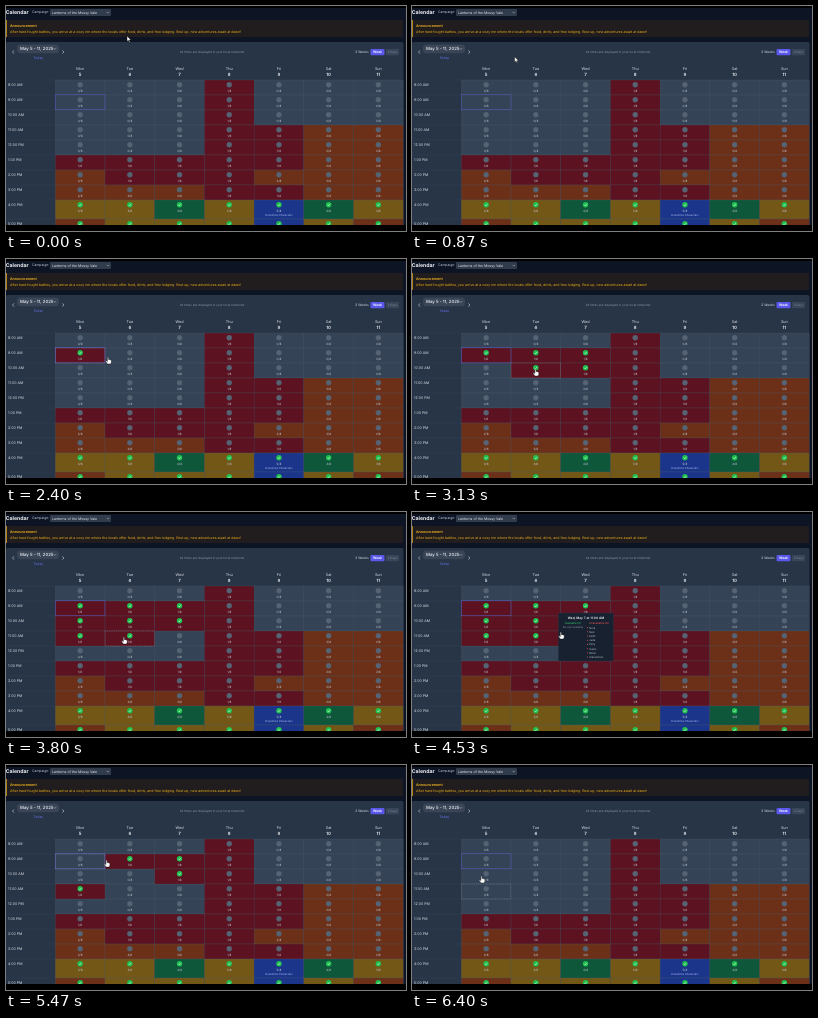
Recreate the animation shown at these times as an HTML page. Size 400 by 225 pixels, loop 6470 ms.

```html
<!DOCTYPE html>
<html lang="en">
<head>
<meta charset="utf-8">
<title>Calendar</title>
<style>
  html, body { margin: 0; width: 100%; height: 100%; overflow: hidden; background: #000; }
  svg { display: block; width: 100vw; height: 100vh; font-family: Inter, "Open Sans", sans-serif; }
  text { text-rendering: geometricPrecision; }
</style>
</head>
<body>
<svg id="stage" viewBox="0 0 400 225"></svg>
<script>
const LOOP = 6470, STEP = 200 / 3;
const LEFT = 49.3, COL = 49.7, TOP = 74, ROW = 15, FLOOR = 219;
const FILL = { s: '#344356', r: '#5c1220', o: '#6c3019', a: '#735717', g: '#0f573b', b: '#1b358a' };
const KINDS = 'sroagb';
const ROWS = ['sssrsss', 'sssrsss', 'sssrsss', 'sssrroo', 'sssrroo',
              'rrrrroo', 'orrrooo', 'ooorroo', 'aagabga', 'oaaabao'];
const DAYS = ['Mon', 'Tue', 'Wed', 'Thu', 'Fri', 'Sat', 'Sun'];

// pointer stops: time, x, y
const PATH = [
  [0, 121, 30], [670, 108, 40], [1400, 88, 80], [1800, 90, 82], [2200, 97, 97], [2333, 97, 97],
  [2400, 102, 98], [2730, 172, 95], [2900, 172, 110], [3130, 124, 110], [3400, 78, 110],
  [3470, 78, 125], [3700, 112, 126], [4330, 149, 120], [4530, 149, 120], [4930, 126, 124],
  [5130, 118, 111], [5270, 80, 110], [5330, 80, 96], [5470, 101, 95], [5670, 165, 95],
  [5800, 170, 110], [6330, 72, 127], [6400, 69.5, 111]
];
const DRAGS = [{ from: 2130, to: 3800, on: true }, { from: 4870, to: LOOP, on: false }];
const TIPS = [
  { from: 1330, to: 1870, col: 0, row: 1, title: 'Mon, May 5 at 9:00 AM' },
  { from: 4190, to: 4730, col: 2, row: 3, title: 'Wed, May 7 at 11:00 AM' }
];

const stage = document.getElementById('stage');

function add(tag, attrs, parent = stage) {
  const el = document.createElementNS('http://www.w3.org/2000/svg', tag);
  for (const k in attrs) el.setAttribute(k, attrs[k]);
  parent.appendChild(el);
  return el;
}
function box(x, y, width, height, fill, more, parent) {
  return add('rect', { x, y, width, height, fill, ...more }, parent);
}
function label(str, x, y, size, fill, more, parent) {
  const el = add('text', { x, y, 'font-size': size, fill, ...more }, parent);
  el.textContent = str;
  return el;
}
function line(d, stroke, width, parent) {
  return add('path', { d, stroke, 'stroke-width': width, fill: 'none' }, parent);
}
const MID = { 'text-anchor': 'middle' };
const BOLD = { 'font-weight': 600 };
const show = (el, on) => el.setAttribute('visibility', on ? 'visible' : 'hidden');
const during = (t, span) => t >= span.from && t < span.to;
const colX = c => LEFT + c * COL;
const rowY = r => r < 9 ? TOP + r * ROW : 213;
const rowH = r => r === 8 ? 19 : ROW;

function drawHeader() {
  box(0, 2, 400, 217, '#0d1424');
  label('Calendar', -0.3, 7.8, 5.2, '#f3f5f8', { 'font-weight': 700 });
  label('Campaign:', 26, 7.4, 3.4, '#c3cad5');
  box(44, 3, 61, 7, '#303b4b', { rx: 1 });
  label('Lanterns of the Mossy Vale', 46, 7.6, 3.5, '#e5e8ee');
  line('M100.6 5.9l1.2 1.2 1.2-1.2', '#cbd2dc', .5);

  box(0, 14, 397, 17, '#211c1d', { rx: 1 });
  box(0, 14, .8, 17, '#d69a15');
  label('Announcement', 4, 21.2, 3.6, '#f5b921', BOLD);
  label('After hard fought battles, you arrive at a cozy inn where the locals offer food, drink, and free lodging. ' +
        'Rest up, new adventures await at dawn!', 4, 26.9, 3.48, '#e8b01c');
}

function drawToolbar() {
  box(0, 36, 397.5, 183, '#283547', { rx: 1.5 });
  box(11, 38.5, 42, 8.8, '#3a4658', { rx: 3.5 });
  line('M8 44.4l-1.5 1.6 1.5 1.6M56.4 44.4l1.5 1.6-1.5 1.6', '#d5dae2', .6);
  label('May 5 - 11, 2025', 14, 44.4, 4.3, '#eef1f5', { 'font-weight': 500 });
  line('M47.6 42.2l1.2 1.2 1.2-1.2', '#cbd2dc', .5);
  label('Today', 32.3, 52.6, 3.4, '#6570e8', MID);
  label('All times are displayed in your local timezone', 206, 47.3, 3.05, '#8c98aa', MID);
  label('2 Weeks', 356, 47.3, 3.3, '#d8dde5', MID);
  box(364.5, 43, 14, 6.2, '#5a58ea', { rx: 1 });
  label('Week', 371.5, 47.3, 3.3, '#fff', { ...MID, ...BOLD });
  box(380, 43, 13, 6.2, '#394659', { rx: 1 });
  label('2 Days', 386.5, 47.3, 3, '#78869a', MID);
}

function drawDays() {
  DAYS.forEach((day, c) => {
    const x = colX(c) + COL / 2;
    label(day, x, 64, 3.8, '#d7dce4', MID);
    label(5 + c, x, 70.3, 4.4, '#f1f3f6', { ...MID, ...BOLD });
  });
}

function drawCell(c, r, kind, ready, parent) {
  const x = colX(c), y = rowY(r), mid = x + COL / 2;
  box(x, y, COL, rowH(r), FILL[kind], { stroke: '#4b586a', 'stroke-width': .25 }, parent);
  add('circle', { cx: mid, cy: y + 4.8, r: 2.7, fill: ready ? '#20c050' : '#536070' }, parent);
  if (ready) line(`M${mid - 1.2} ${y + 4.9}l.9 .9 1.6-1.9`, '#f0fff4', .6, parent);
  else add('circle', { cx: mid, cy: y + 4.8, r: 1.2, fill: 'none', stroke: '#6c7888', 'stroke-width': .3 }, parent);
  label(`${KINDS.indexOf(kind)}/8`, mid, y + 12.2, 3, '#bcc4cf', MID, parent);
}

function drawGrid(parent) {
  ROWS.forEach((kinds, r) => {
    const hour = (r + 7) % 12 + 1;
    label(`${hour}:00 ${r < 4 ? 'AM' : 'PM'}`, 2, rowY(r) + 6.2, 3.6, '#dce1e8', {}, parent);
    line(`M0 ${rowY(r)}H${LEFT}`, '#36445a', .3, parent);
    [...kinds].forEach((kind, c) => drawCell(c, r, kind, r > 7, parent));
  });
  label('Downtime Characters', colX(4) + COL / 2, 209.8, 2.7, '#aebcf0', MID, parent);
}

function makeTip({ col, row, title }) {
  const g = add('g', { transform: `translate(${colX(col) - 2.3} ${rowY(row) - 18})` });
  box(0, 0, 55, 48, '#172130', { rx: 1.3, stroke: '#354154', 'stroke-width': .3 }, g);
  label(title, 27.5, 6.2, 3.2, '#f0f3f7', { ...MID, ...BOLD }, g);
  label('Available (0)', 14.5, 11, 2.8, '#35c66b', MID, g);
  label('Unavailable (8)', 40.5, 11, 2.8, '#ee5353', MID, g);
  label('No one available', 14.5, 15.2, 2.6, '#8793a5', MID, g);
  ['Nora', 'Ned', 'Edith', 'Jude', 'Polly', 'Gwen', 'Robin', 'Clementine'].forEach((name, i) => {
    const y = 15.5 + i * 4.2;
    add('circle', { cx: 29.1, cy: y - .9, r: .55, fill: '#e04a4a' }, g);
    label(name, 30.8, y, 2.6, '#b9c1cd', {}, g);
  });
  return g;
}

function pointAt(t) {
  const i = PATH.findIndex(p => p[0] > t);
  if (i < 0) return PATH[PATH.length - 1].slice(1);
  const [t0, x0, y0] = PATH[Math.max(i - 1, 0)], [t1, x1, y1] = PATH[i];
  const k = Math.max(0, (t - t0) / (t1 - t0));
  return [x0 + (x1 - x0) * k, y0 + (y1 - y0) * k];
}

// the page reacts one step behind the pointer
function cellAt(t) {
  const [x, y] = pointAt(t - STEP);
  return [Math.floor((x - LEFT) / COL), Math.floor((y - TOP) / ROW)];
}

// cells that are painted after replaying every drag up to a time
function paintedAt(t) {
  const cells = new Set();
  for (let s = 0; s <= t + 1; s += STEP) {
    const drag = DRAGS.find(d => during(s, d));
    if (!drag) continue;
    const key = cellAt(s).join();
    if (drag.on) cells.add(key);
    else cells.delete(key);
  }
  return cells;
}

drawHeader();
drawToolbar();
drawDays();
const clip = add('clipPath', { id: 'view' });
box(0, 0, 400, FLOOR, '#fff', {}, clip);
drawGrid(add('g', { 'clip-path': 'url(#view)' }));

const painted = {};
for (let r = 1; r < 4; r++) {
  for (let c = 0; c < 3; c++) {
    painted[[c, r]] = add('g', {});
    drawCell(c, r, 'r', true, painted[[c, r]]);
  }
}
box(LEFT, TOP + ROW - .2, COL, ROW, 'none', { stroke: '#5a5ed2', 'stroke-width': .45 });
const hover = box(0, 0, COL - .4, ROW, 'none',
  { stroke: '#a9b2c0', 'stroke-width': .3, 'stroke-dasharray': '1 .8' });
const tips = TIPS.map(makeTip);

const edge = { fill: '#fff', stroke: '#111', 'stroke-width': .45, 'stroke-linejoin': 'round' };
const arrow = add('path', { d: 'M0 0V5.4L1.3 4.3 2.2 6.2 3.1 5.8 2.2 3.9H4Z', ...edge });
const hand = add('path', {
  d: 'M-.6 .5Q0-.4 .6 .5V2.6L1.6 2.6 2.5 2.9 3.4 3.3V5.2L2.7 7H-.5L-2.3 4.5Q-2.4 3.6-1.5 3.8L-.6 4.6Z', ...edge
});

function draw(time) {
  const t = Math.floor((time % LOOP + 5) / STEP) * STEP;
  const cells = paintedAt(t);
  for (const key in painted) show(painted[key], cells.has(key));

  const [c, r] = cellAt(t);
  show(hover, r >= 0 && c >= 0);
  hover.setAttribute('x', colX(c) + .2);
  hover.setAttribute('y', rowY(r));
  tips.forEach((g, i) => show(g, during(t, TIPS[i])));

  const [x, y] = pointAt(t);
  for (const el of [arrow, hand]) el.setAttribute('transform', `translate(${x} ${y})`);
  show(arrow, y < TOP);
  show(hand, y >= TOP);
}

const start = performance.now();
function tick() {
  draw(performance.now() - start);
  requestAnimationFrame(tick);
}
tick();
</script>
</body>
</html>
```
